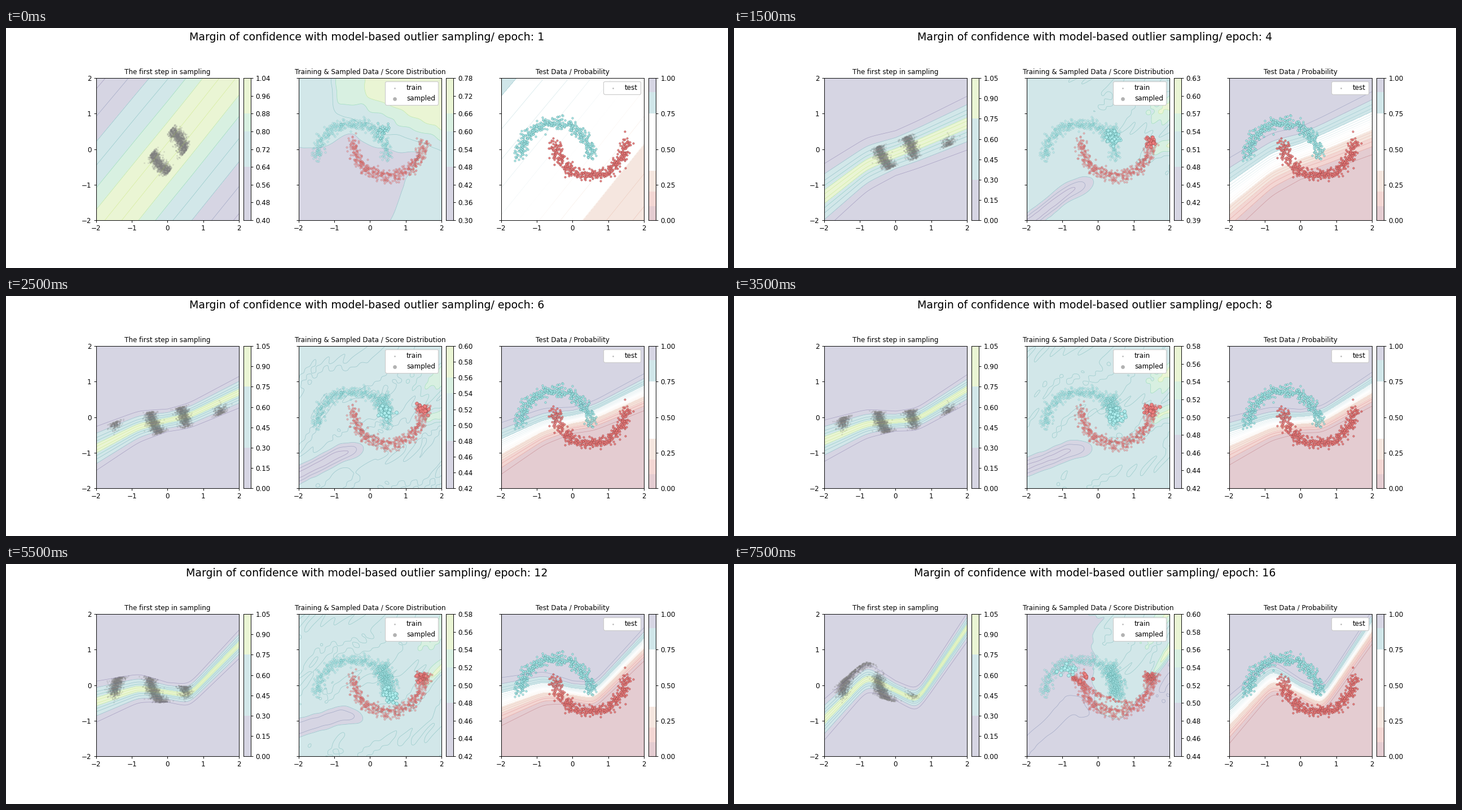
Write a matplotlib script that moves like this. It is 1280 px wide and 427 px high and loops after 8 s.

```python
import numpy as np
import matplotlib.pyplot as plt
from matplotlib.animation import FuncAnimation
from matplotlib.colors import LinearSegmentedColormap
from matplotlib.ticker import MaxNLocator

W, H, DPI = 1280, 427, 1280 / 15
EPOCHS, STEP_MS = 16, 500
SIDE, TOP, PITCH = 252.8, 89.2, 359

plt.rcParams.update({"font.family": "DejaVu Sans", "font.size": 10})

LILAC, BLUE, GREEN, LIME = "#d6d5e3", "#d2e7e9", "#d8f0e1", "#eaf5d4"
PROB_EDGES = np.linspace(0, 1, 21)
PROB_BANDS = (["#e4ccd1"] * 2 + ["#f3d6d3"] * 2 + ["#f5e6df"] * 3
              + ["#ffffff"] * 8 + ["#d0e6e9"] * 3 + [LILAC] * 2)
PROB_LINES = LinearSegmentedColormap.from_list(
    "prob", ["#8b1a2b", "#d9605a", "#e0b090", "#ffffff", "#80b8c0", "#50a0a8", "#3c3480"])
FILL = {"c": "#afeeee", "r": "#f08080"}
EDGE = {"c": "#559c9c", "r": "#9c4848"}

# Training milestones: boundary height at four knots, then the score range
KEYS = [1, 4, 6, 10, 14, 16]
KNOTS = [-2, -.8, .6, 2]
HEIGHTS = [[-2.6, -1.34, -.88, -.45, -.48, -.97],
           [-1.1, -.42, -.26, -.10, -.06, .25],
           [.63, .12, .04, -.16, -.42, -.45],
           [2.4, .73, .70, .87, 1.42, 1.62]]
LOW = [.31, .40, .425, .4365, .4405, .445]
HIGH = [.75, .615, .585, .556, .572, .59]


def at(e, values):
    return np.interp(e, KEYS, values)


def step(z):
    return .5 + .5 * np.tanh(z)


def boundary(e, x, w=.08):
    ys = [at(e, row) for row in HEIGHTS]
    slopes = np.diff(ys) / np.diff(KNOTS)
    mid = ys[0] + slopes[0] * (x - KNOTS[0])
    for knot, turn in zip(KNOTS[1:-1], np.diff(slopes)):
        mid = mid + turn * w * np.logaddexp(0, (x - knot) / w)
    return mid


def logit(e, x, y):
    soft = .11 + 3.5 * np.exp(-1.07 * (e - 1)) + np.maximum(-.06 * x, .025 * x)
    return (y - boundary(e, x)) / soft


def wiggle(x, y):
    return (np.sin(5 * (y - .8 * x) + 2 * np.sin(1.7 * x + y))
            + .5 * np.sin(13 * (y - x) + 3 * np.sin(2.3 * x))
            + .3 * np.sin(17 * x + 6 * np.cos(4 * y)))


def early_score(x, y):
    rise = y - .05 - .4 * np.exp(-((x + .6) / .5) ** 2) + .2 * step(2 * x - 1)
    edge = y - 1.05 + .12 * (x + 1) + .08 * (x + 1) ** 2
    upper = (.18 * step(5 * rise) + .23 * step(4 * edge) * step(12 * (x + 1))
             + .14 * step(10 * (edge - .5)) * step(12 * (x + .15)))
    right = .18 * step(7 * (x - .55 - .42 * (y + 2)))
    return .29 + np.maximum(upper, right) + .02 * wiggle(.6 * x, .6 * y)


def late_score(e, x, y):
    v = y - boundary(e, x)
    late = np.clip((e - 14) / 2, 0, 1)
    trough = np.exp(-((v + .75) / .25) ** 2) * step(-3 * (x + .3))
    strip = np.exp(-((v + .6) / .2) ** 2) * step(4 * (x - 1.6))
    fan = np.exp(-((v - .5) / .4) ** 2) * step(4 * (x - 1.3))
    inside = step(4 * (x + .1)) * step(4 * (v + .6))
    rough = .015 + .05 * step(2 * (x + y - 1.5))
    return (.48 - .2 * late - (.45 - .3 * late) * trough + .42 * strip
            + .3 * fan + .22 * late * inside + rough * wiggle(x, y))


def score(e, x, y):
    early = np.clip((4 - e) / 3, 0, 1)
    level = early * early_score(x, y) + (1 - early) * late_score(e, x, y)
    lo, hi = at(e, LOW), at(e, HIGH)
    return lo + (hi - lo) * np.clip(level, 0, 1)


def moons(n, rng):
    t = np.linspace(0, np.pi, n)
    up = np.c_[np.cos(t) - .5, np.sin(t) - .25]
    low = np.c_[.5 - np.cos(t), .25 - np.sin(t)]
    return [m + rng.normal(0, .085, m.shape) for m in (up, low)]


def picks(e):
    """Points sampled at one epoch: a blob sliding down the tip, then the arcs."""
    rng = np.random.default_rng(100 + e)

    def blob(x, y, sx, sy, n):
        return rng.normal((x, y), (sx, sy), (n, 2))

    def arc(n):
        x = 1.5 * rng.random(n) ** 2 - .7
        return np.c_[x, .25 * x * x - .5 * x - .25] + blob(0, 0, .04, .04, n)

    if e < 13:
        out = [("c", blob(.36 + .017 * (e - 1), .5 - .07 * (e - 1), .1, .1, 35))]
        if e >= 4:
            out.append(("r", blob(1.48, .22, .09, .07, 42 - 3 * e)))
        return out
    if e < 16:
        return [("r", arc(45))]
    return [("c", blob(-.88, .48, .17, .1, 24)), ("r", blob(-.4, .26, .12, .06, 9))]


rng = np.random.default_rng(7)
train, test = moons(450, rng), moons(450, rng)
pool = np.vstack(moons(5000, rng))
grid = np.linspace(-2, 2, 180)
GX, GY = np.meshgrid(grid, grid)

fig = plt.figure(figsize=((W + 1e-6) / DPI, (H + 1e-6) / DPI), dpi=DPI, facecolor="white")


def place(i, dx, w):
    return fig.add_axes([(160 + i * PITCH + dx) / W, 1 - (TOP + SIDE) / H, w / W, SIDE / H])


axes = [place(i, 0, SIDE) for i in range(3)]
bars = [place(i, SIDE + 8.53, .05 * SIDE) for i in range(3)]
heading = fig.suptitle("", fontsize=16, y=.983)


def bands(n):
    limits = [(.3, LILAC), (.7, BLUE), (.8, GREEN), (2, LIME)]
    return [next(c for top, c in limits if t < top) for t in np.linspace(0, 1, n)]


def auto_levels(z):
    return MaxNLocator(8, min_n_ticks=1).tick_values(z.min(), z.max())


def panel(i, title, z, levels, colors, ticks, lines="viridis"):
    ax, cax = axes[i], bars[i]
    ax.clear()
    z = np.clip(z, levels[0] + 1e-6, levels[-1] - 1e-6)
    ax.contourf(GX, GY, z, levels=levels, colors=colors)
    ax.contour(GX, GY, z, levels=levels, cmap=lines, alpha=.33, linewidths=.6)
    ax.set(xlim=(-2, 2), ylim=(-2, 2), xticks=range(-2, 3), yticks=range(-2, 3))
    ax.set_title(title, fontsize=10)
    ax.tick_params(labelleft=i == 0)

    cax.clear()
    cax.bar(0, np.diff(levels), 1, bottom=levels[:-1], color=colors)
    cax.set(xlim=(-.5, .5), ylim=(levels[0], levels[-1]), xticks=[])
    cax.yaxis.tick_right()
    digits = 3 if round(1000 * (ticks[1] - ticks[0])) % 10 else 2
    cax.set_yticks(ticks, [f"{v:.{digits}f}" for v in ticks])


def dots(ax, pts, cls, size, alpha):
    ax.scatter(*pts.T, s=size, c=FILL[cls], edgecolors=EDGE[cls],
               linewidths=.45, alpha=alpha)


def legend(ax, *entries):
    for name, size in entries:
        ax.scatter([], [], s=size, c="gray", alpha=.6, linewidths=.3, label=name)
    ax.legend(loc="upper right", framealpha=1)


def draw(i):
    e = i + 1
    heading.set_text(f"Margin of confidence with model-based outlier sampling/ epoch: {e}")
    p = step(logit(e, GX, GY) / 2)

    margin = 1 - abs(2 * p - 1)
    levels = auto_levels(margin)
    panel(0, "The first step in sampling", margin, levels, bands(len(levels) - 1), levels)
    px, py = pool.T
    # Late epochs turn away from the right side, which is already sampled
    doubt = abs(logit(e, px, py)) + .6 * max(e - 10, 0) * np.clip(px + .1, 0, None)
    chosen = pool[np.argsort(doubt)[:2400]]
    axes[0].scatter(*chosen.T, s=4, c="gray", alpha=.2, linewidths=.3)

    spread = score(e, GX, GY)
    levels = auto_levels(np.array([at(e, LOW), at(e, HIGH)]))
    panel(1, "Training & Sampled Data / Score Distribution", spread,
          levels, bands(len(levels) - 1), levels)
    for cls, pts in zip("cr", train):
        dots(axes[1], pts, cls, 8, .42)
    for past in range(1, e):
        for cls, pts in picks(past):
            dots(axes[1], pts, cls, 8, .5)
    for cls, pts in picks(e):
        dots(axes[1], pts, cls, 9 + 4 * min(e - 1, 4), .95)
    legend(axes[1], ("train", 3), ("sampled", 28))

    panel(2, "Test Data / Probability", p, PROB_EDGES, PROB_BANDS,
          np.linspace(0, 1, 5), PROB_LINES)
    for cls, pts in zip("cr", test):
        dots(axes[2], pts, cls, 8, .95)
    legend(axes[2], ("test", 3))


anim = FuncAnimation(fig, draw, frames=EPOCHS, interval=STEP_MS,
                     repeat=True, repeat_delay=0)
plt.show()
```
